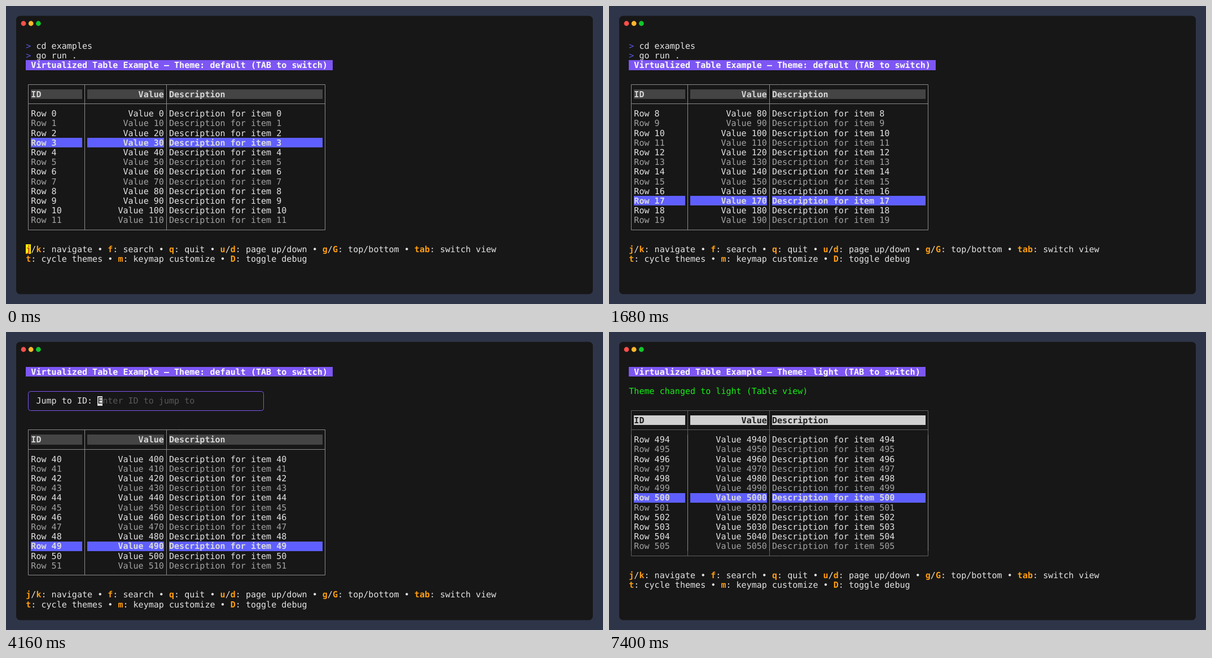
Write an HTML page with a canvas that moves like this. It is 1058 by 529 pixels and loops after 8000 ms.

```html
<!DOCTYPE html>
<html lang="en">
<head>
<meta charset="utf-8">
<title>Virtualized table in a terminal</title>
<style>
  html, body { margin: 0; width: 100%; height: 100%; overflow: hidden; background: #2e3548; }
  canvas { display: block; }
</style>
</head>
<body>
<canvas id="stage" width="1058" height="529"></canvas>
<script>
const ctx = document.getElementById('stage').getContext('2d');
const LOOP = 8000, FRAME = 40;
const LEFT = 35.3, TOP = 62, CELL_W = 9.06, CELL_H = 17.2, BASELINE = 13.7;
const FONT = '15.05px "DejaVu Sans Mono", monospace';
const VISIBLE_ROWS = 12, SCROLL_ROW = 9;
const TEXT = '#e4e4e4', DIM = '#a3a3a3', PURPLE = '#7d56f4', ORANGE = '#ff9d0f';

const THEMES = {
  default: { headBg: '#444444', headFg: '#d6d6d6', frame: '#8a8a8a', side: '#8a8a8a' },
  dark: { headBg: '#303030', headFg: '#e4e4e4', frame: '#585858', side: '#8a8a8a' },
  light: { headBg: '#d0d0d0', headFg: '#1c1c1c', frame: '#606060', side: '#8a8a8a' }
};
const COLUMNS = [
  { start: 1, width: 10, title: 'ID', cell: i => `Row ${i}` },
  { start: 12, width: 15, title: 'Value', right: true, cell: i => `Value ${i * 10}` },
  { start: 28, width: 30, title: 'Description', cell: i => `Description for item ${i}` }
];
const DIVIDERS = [0, 11, 27, 58];
// Asterisks toggle the key highlight.
const HELP = [
  '*j*/*k*: navigate • *f*: search • *q*: quit • *u*/*d*: page up/down • *g*/*G*: top/bottom • *tab*: switch view',
  '*t*: cycle themes • *m*: keymap customize • *D*: toggle debug'
];

const cellX = col => LEFT + col * CELL_W;
const cellY = row => TOP + row * CELL_H;
const midX = col => Math.floor(cellX(col + 0.5)) + 0.5;
const midY = row => Math.floor(cellY(row + 0.5)) + 0.5;

function text(col, row, string, color, bold) {
  ctx.font = (bold ? 'bold ' : '') + FONT;
  ctx.fillStyle = color;
  [...string].forEach((char, i) => {
    if (char !== ' ') ctx.fillText(char, cellX(col + i), cellY(row) + BASELINE);
  });
}

function fill(col, row, width, color) {
  const x = Math.round(cellX(col)), y = Math.round(cellY(row));
  ctx.fillStyle = color;
  ctx.fillRect(x, y, Math.round(cellX(col + width)) - x, Math.round(cellY(row + 1)) - y);
}

function line(x1, y1, x2, y2, color) {
  ctx.strokeStyle = color;
  ctx.beginPath();
  ctx.moveTo(x1, y1);
  ctx.lineTo(x2, y2);
  ctx.stroke();
}

function drawWindow() {
  ctx.fillStyle = '#2e3548';
  ctx.fillRect(0, 0, 1058, 529);
  ctx.fillStyle = '#171717';
  ctx.beginPath();
  ctx.roundRect(18, 17.5, 1022, 494, 7);
  ctx.fill();
  ['#ff4f4b', '#ffb62b', '#12c52c'].forEach((color, i) => {
    ctx.fillStyle = color;
    ctx.beginPath();
    ctx.arc(31 + i * 13.2, 31, 4.4, 0, Math.PI * 2);
    ctx.fill();
  });
}

function drawTitle(row, theme) {
  const title = ` Virtualized Table Example – Theme: ${theme} (TAB to switch) `;
  fill(0, row, title.length, PURPLE);
  text(0, row, title, '#fafafa', true);
}

function drawCells(row, content, color, background) {
  for (const column of COLUMNS) {
    const string = content(column);
    const indent = column.right ? column.width - string.length : 0;
    if (background) fill(column.start, row, column.width, background);
    text(column.start + indent, row, string, color, Boolean(background));
  }
}

function drawTable(row, state) {
  const theme = THEMES[state.theme];
  const bottom = row + 3 + VISIBLE_ROWS;
  const left = midX(0), right = midX(58);
  for (const col of DIVIDERS) {
    const x = midX(col);
    line(x, midY(row), x, midY(bottom), theme.frame);
    line(x, cellY(row + 3), x, cellY(bottom), theme.side);
  }
  for (const r of [row, row + 2, bottom]) line(left, midY(r), right, midY(r), theme.frame);

  drawCells(row + 1, column => column.title, theme.headFg, theme.headBg);
  for (let i = 0; i < VISIBLE_ROWS; i++) {
    const item = state.offset + i;
    const selected = item === state.selected;
    const color = selected ? '#dadada' : item % 2 === 0 || i === SCROLL_ROW ? TEXT : DIM;
    drawCells(row + 3 + i, column => column.cell(item), color, selected && '#5f5fff');
  }
}

function drawHelp(row) {
  HELP.forEach((help, i) => {
    let col = 0;
    help.split('*').forEach((part, j) => {
      const isKey = j % 2 === 1;
      text(col, row + i, part, isKey ? ORANGE : TEXT, isKey);
      col += part.length;
    });
  });
}

function drawCursor(row, char) {
  fill(0, row, 1, '#fff000');
  text(0, row, char, '#c8401a', true);
}

function drawSearch(input) {
  ctx.strokeStyle = PURPLE;
  ctx.beginPath();
  ctx.roundRect(midX(0), midY(2), midX(46) - midX(0), midY(4) - midY(2), 4);
  ctx.stroke();
  text(2, 3, 'Jump to ID:', TEXT);
  if (input) {
    text(14, 3, input, TEXT);
    fill(14 + input.length, 3, 1, '#dddddd');
  } else {
    text(15, 3, 'nter ID to jump to', '#585858');
    fill(14, 3, 1, '#dddddd');
    text(14, 3, 'E', '#171717');
  }
}

function selectionAt(t) {
  if (t >= 5360) return 500;
  if (t >= 3560) return 49;
  if (t >= 3000) return 37;
  if (t >= 1000) return 5 + Math.min(20, Math.floor((t - 1000) / 60) + 1);
  return t < 200 ? 3 : t < 400 ? 4 : 5;
}

function stateAt(t) {
  const selected = selectionAt(t);
  const theme = t < 6480 ? 'default' : t < 7280 ? 'dark' : 'light';
  return {
    selected,
    theme,
    offset: selected === 500 ? 494 : Math.max(0, selected - SCROLL_ROW),
    shell: t < 4120,
    searching: t >= 4120 && t < 5360,
    input: t < 4720 ? '' : t < 4760 ? '50' : '500',
    message: t < 5360 ? '' : t < 6480 ? 'Found at index 500' : `Theme changed to ${theme} (Table view)`,
    navCursor: t < 120 || (t >= 200 && t < 320) || (t >= 1000 && t < 1640 && (t - 1000) % 120 === 80),
    themeCursor: (t >= 6480 && t < 6560) || (t >= 7280 && t < 7400)
  };
}

function render(t) {
  const state = stateAt(t);
  const tableRow = state.searching ? 6 : 4;
  drawWindow();
  if (state.shell) {
    ['cd examples', 'go run .'].forEach((command, i) => {
      text(0, i, '>', '#5a56e0');
      text(2, i, command, TEXT);
    });
  }
  drawTitle(state.shell ? 2 : 0, state.theme);
  if (state.searching) drawSearch(state.input);
  text(0, 2, state.message, '#16f016');
  drawTable(tableRow, state);
  drawHelp(tableRow + 17);
  if (state.navCursor) drawCursor(21, 'j');
  if (state.themeCursor) drawCursor(22, 't');
}

ctx.textRendering = 'geometricPrecision';
ctx.lineWidth = 1;
const start = performance.now();
function tick() {
  const t = (performance.now() - start) % LOOP;
  render(Math.floor(t / FRAME) * FRAME);
  requestAnimationFrame(tick);
}
tick();
</script>
</body>
</html>
```
